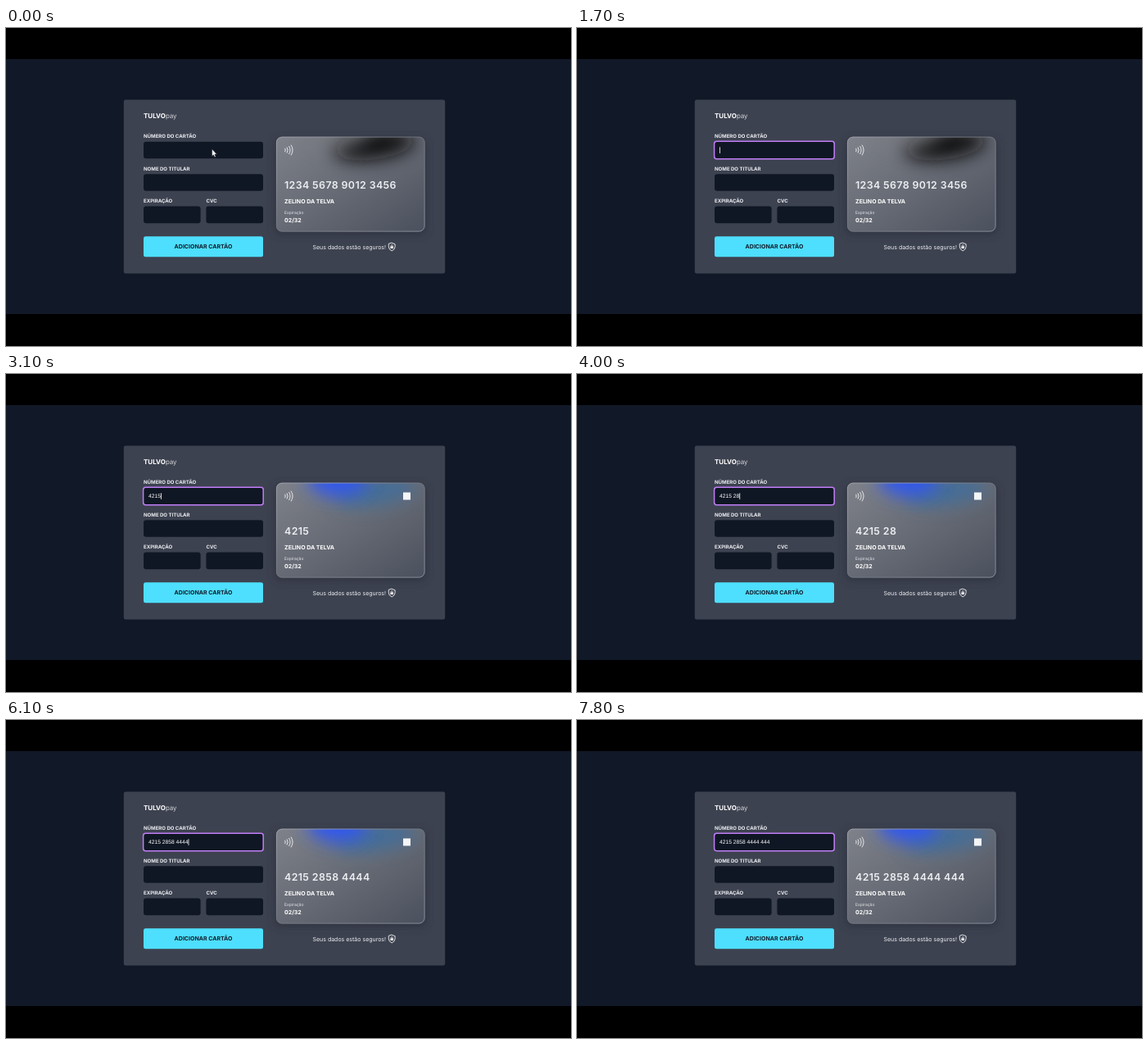
Animation, 690 px wide and 388 px high, one loop 8 s. Source, as an HTML page:

```html
<!DOCTYPE html>
<html lang="pt-BR">
<head>
<meta charset="utf-8">
<title>Cartão</title>
<style>
  html, body { margin: 0; width: 100%; height: 100%; overflow: hidden; background: #000; }
  svg { display: block; width: 690px; height: 388px; }
  text { font-family: Inter, sans-serif; fill: #fff; text-rendering: geometricPrecision; white-space: pre; }
  .label { font-size: 6.05px; font-weight: 700; fill: #eceef2; }
  .field { fill: #101724; }
  .typed { font-family: "Liberation Sans", Arial, sans-serif; font-size: 6.7px; }
  .number { font-size: 12.4px; font-weight: 600; letter-spacing: .38px; fill: #eceef1; }
  .bold { font-size: 7px; font-weight: 700; }
  .line { fill: none; stroke: #f2f3f5; stroke-linecap: round; stroke-linejoin: round; }
</style>
</head>
<body>
<svg viewBox="0 0 690 388">
  <defs>
    <linearGradient id="metal" x1="0" y1="0" x2="1" y2="1">
      <stop offset="0" stop-color="#7f828a"/>
      <stop offset=".5" stop-color="#666a74"/>
      <stop offset="1" stop-color="#4a505d"/>
    </linearGradient>
    <linearGradient id="edge" x1="0" y1="0" x2="1" y2="1">
      <stop offset="0" stop-color="#a5a8af"/>
      <stop offset=".5" stop-color="#737883"/>
      <stop offset="1" stop-color="#969ba5"/>
    </linearGradient>
    <filter id="soft" x="-60%" y="-100%" width="220%" height="300%"><feGaussianBlur stdDeviation="11"/></filter>
    <filter id="shade" x="-20%" y="-20%" width="140%" height="140%"><feGaussianBlur stdDeviation="5"/></filter>
    <clipPath id="cardClip"><rect x="330" y="132.7" width="181.5" height="115.8" rx="7"/></clipPath>
  </defs>

  <rect width="690" height="388" fill="#000"/>
  <rect y="38" width="690" height="311" fill="#111827"/>
  <rect x="143.8" y="87.4" width="392.4" height="212" rx="2.5" fill="#3d4250"/>

  <text x="168" y="109.7" font-size="8"><tspan font-weight="700">TULVO</tspan><tspan font-weight="300">pay</tspan></text>

  <text class="label" x="168" y="134.1">NÚMERO DO CARTÃO</text>
  <text class="label" x="168" y="173.5">NOME DO TITULAR</text>
  <text class="label" x="168" y="213">EXPIRAÇÃO</text>
  <text class="label" x="244.5" y="213">CVC</text>
  <rect class="field" x="168" y="138.7" width="146" height="20.6" rx="3"/>
  <rect class="field" x="168" y="178.2" width="146" height="20.6" rx="3"/>
  <rect class="field" x="168" y="217.6" width="69.6" height="20.6" rx="3"/>
  <rect class="field" x="244.4" y="217.6" width="69.6" height="20.6" rx="3"/>
  <rect id="ring" x="167.6" y="138.3" width="146.6" height="21.4" rx="3" fill="none" stroke="#c27df8" stroke-width="1.5"/>
  <text id="typed" class="typed" x="174.1" y="151.4"></text>
  <rect id="caret" y="145.3" width=".8" height="7.6" fill="#fff"/>

  <rect x="168" y="254.2" width="146" height="25" rx="2.5" fill="#4ddffd"/>
  <text x="241" y="269.2" text-anchor="middle" font-size="7" font-weight="700" style="fill:#111c2c">ADICIONAR CARTÃO</text>

  <rect x="327" y="134" width="187" height="119" rx="9" fill="#252b38" opacity=".5" filter="url(#shade)"/>
  <g clip-path="url(#cardClip)">
    <rect x="330" y="132" width="182" height="117" fill="url(#metal)"/>
    <ellipse id="glowRight" cx="450" cy="143" rx="50" ry="17" transform="rotate(-8 450 143)" filter="url(#soft)"/>
    <ellipse id="glowLeft" cx="405" cy="127" rx="37" ry="22" filter="url(#soft)"/>
  </g>
  <rect x="330.4" y="133.1" width="180.7" height="115" rx="6.6" fill="none" stroke="url(#edge)" stroke-width=".8"/>
  <g class="line" stroke-width=".9">
    <path d="M340.8 147.2q1 1.8 0 3.6M343.2 145.8q2 3.2 0 6.4M345.7 144.4q3 4.6 0 9.2M348.2 143q4 6 0 12"/>
  </g>
  <rect id="logo" x="485" y="144.5" width="9" height="9" fill="#f4f5f7"/>
  <text id="number" class="number" x="340" y="196.3"></text>
  <text class="bold" x="340" y="213.5">ZELINO DA TELVA</text>
  <text x="340" y="227.2" font-size="5" style="fill:#e4e6ea">Expiração</text>
  <text class="bold" x="340" y="237.2">02/32</text>

  <text x="374.5" y="269.6" font-size="7" style="fill:#eceef2">Seus dados estão seguros!</text>
  <path class="line" stroke-width=".9" d="M471.2 262.2l3.9 1.5v3.1q0 3.5-3.9 5.1q-3.9-1.6-3.9-5.1v-3.1z"/>
  <rect x="469.4" y="266.2" width="3.6" height="2.9" rx=".4" fill="#f2f3f5"/>
  <path class="line" stroke-width=".7" d="M470.2 266.2v-.6a1 1 0 0 1 2 0v.6"/>

  <path id="pointer" d="M251.6 147.8v8.6l1.9-1.7l1.3 2.9l1.4-.6l-1.3-2.9h2.5z" fill="#fff" stroke="#161a22" stroke-width=".5"/>
</svg>
<script>
  const LOOP = 8000;
  const DIGITS = "4215285844444444";
  // [start ms, digits typed, caret visible]
  const STEPS = [
    [0, 0, 0], [600, 0, 1], [1300, 0, 0], [1700, 0, 1], [1800, 1, 1],
    [2300, 2, 1], [2700, 3, 1], [2900, 4, 1], [3500, 4, 0], [3700, 5, 1],
    [4000, 6, 1], [4300, 7, 1], [4600, 8, 1], [5100, 8, 0], [5300, 9, 1],
    [5500, 10, 1], [5800, 11, 1], [6000, 12, 1], [6400, 13, 1], [6600, 14, 1],
    [6900, 15, 1], [7000, 16, 1], [7600, 16, 0], [7800, 15, 0]
  ];

  const el = id => document.getElementById(id);
  const show = (id, on) => el(id).setAttribute("opacity", Number(on));
  const grouped = n => DIGITS.slice(0, n).replace(/(.{4})(?=.)/g, "$1 ");
  let last = null;

  function apply(time, count, caret) {
    const value = grouped(count);
    el("typed").textContent = value;
    el("number").textContent = value || "1234 5678 9012 3456";
    el("caret").setAttribute("x", 174.2 + (value ? el("typed").getComputedTextLength() : 0));
    show("caret", caret);
    el("glowRight").setAttribute("fill", count ? "#436d99" : "#101010");
    el("glowLeft").setAttribute("fill", count ? "#2d57f2" : "#77797e");
    show("glowLeft", count ? 1 : 0.55);
    show("pointer", time < 1700);
  }

  function draw(now) {
    const t = now % LOOP;
    const step = STEPS.findLast(s => s[0] <= t);
    if (step !== last) apply(...(last = step));
    show("ring", t < 600 ? 0 : t < 700 ? 0.6 : 1);
    show("logo", t >= 1900);
  }

  const start = performance.now();
  function tick() {
    draw(performance.now() - start);
    requestAnimationFrame(tick);
  }
  tick();
</script>
</body>
</html>
```
